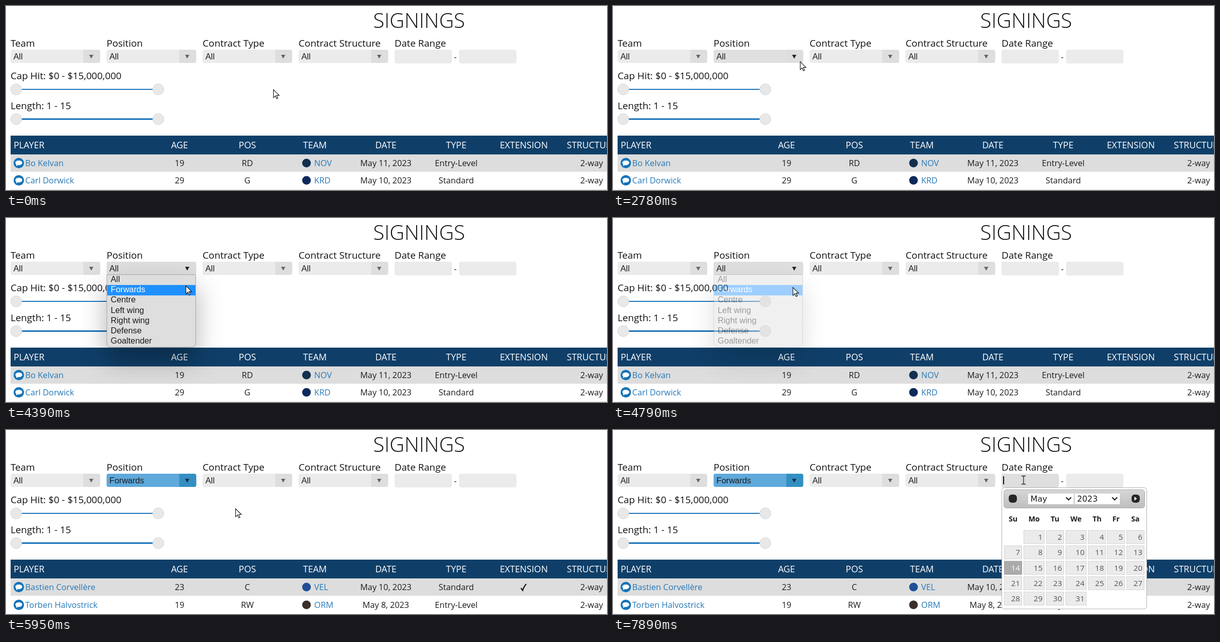
An HTML page that plays this animation: 1174 by 362 pixels, repeating every 8 s.

```html
<!DOCTYPE html>
<html lang="en">
<head>
<meta charset="utf-8">
<title>Signings</title>
<style>
  html, body { margin: 0; width: 100%; height: 100%; overflow: hidden; background: #fff; }
  svg { display: block; }
  text { font: 16.25px "Open Sans", "Noto Sans", sans-serif; fill: #1c1c1c; }
  .title { font-size: 40px; font-weight: 300; fill: #111; }
  .label { font-size: 18.75px; fill: #111; }
  .head { font-size: 17.5px; fill: #fff; }
  .link { fill: #2779b8; }
  .ui { font-family: "Liberation Sans", Arial, sans-serif; }
  .mid { text-anchor: middle; }
  .end { text-anchor: end; }
  .pick { font: 15.8px "DejaVu Sans", sans-serif; }
  .wd { font-size: 14.2px; font-weight: 700; }
  .day { font-size: 15px; fill: #555; }
  .shade { filter: drop-shadow(0 25px 25px rgba(0, 0, 0, .3)); }
</style>
</head>
<body>
<svg id="stage" width="1174" height="362" viewBox="0 0 1174 362">
  <defs>
    <linearGradient id="bar" x2="0" y2="1">
      <stop offset="0" stop-color="#d6d6d6"/><stop offset="1" stop-color="#bebebe"/>
    </linearGradient>
  </defs>
</svg>
<script>
const LOOP = 8000, TICK = 70;
const stage = document.getElementById('stage');

const text = (x, y, s, cls = '') => `<text x="${x}" y="${y}" class="${cls}">${s}</text>`;
const rect = (x, y, w, h, fill, more = '') =>
  `<rect x="${x}" y="${y}" width="${w}" height="${h}" fill="${fill}" ${more}/>`;
const path = (d, more) => `<path d="${d}" ${more}/>`;
const group = (id, body, more = '') => `<g id="${id}" ${more}>${body}</g>`;

function select(label, i) {
  const x = 9 + i * 187.5;
  return text(x, 80, label, 'label') +
    rect(x, 86, 175, 26, '#ebebeb', `rx="4" id="box${i}"`) +
    path(`M${x + 142} 86h29a4 4 0 0 1 4 4v18a4 4 0 0 1-4 4h-29z`, `fill="#dedede" id="btn${i}"`) +
    path(`M${x + 153.3} 96h8.4l-4.2 7.6z`, `fill="#666" id="arrow${i}"`) +
    `<text x="${x + 5.5}" y="105" class="ui" id="value${i}">All</text>`;
}

function slider(label, y, thick) {
  const knob = x => `<circle cx="${x}" cy="${y}" r="10.8" fill="#e8e8e8" stroke="#d6d6d6"/>`;
  return text(9, y - 20, label, 'label') +
    rect(20, y - thick / 2, 278, thick, '#1b75bb') + knob(20) + knob(297.5);
}

const COLS = [339, 471.5, 603.5, 742, 879.5, 1011.5, 1144];

function row(y, [name, age, pos, team, color, date, type, extended]) {
  const base = y + 6;
  const cell = (i, s) => text(COLS[i], base, s, 'mid');
  const bubble = `M25 ${y - 5}c4 0 6.7 2 6.7 4.6s-2.7 4.6-6.7 4.6q-1 0-2-.2-1.600 1.500-4 1.500` +
    `q1.300-1.200 1.200-2.600-1.900-1.300-1.900-3.300c0-2.600 2.700-4.600 6.700-4.600z`;
  return `<circle cx="25" cy="${y}" r="10.2" fill="#1574b9"/>` + path(bubble, 'fill="#fff"') +
    text(37.5, base, name, 'link') + cell(0, age) + cell(1, pos) +
    `<circle cx="587" cy="${y}" r="8.500" fill="${color}"/>` + text(602, base, team, 'link') +
    cell(3, date) + cell(4, type) + cell(6, '2-way') +
    (extended ? path(`M1006 ${y + 2}l3.300 4.500q2.500-8 7-12.500`,
      'fill="none" stroke="#111" stroke-width="2.200"') : '');
}

function popup() {
  const items = ['All', 'Forwards', 'Centre', 'Left wing', 'Right wing', 'Defense', 'Goaltender'];
  const shape = 'M197 111.500H370.500V246a8 8 0 0 1-8 8H205a8 8 0 0 1-8-8z';
  return path(shape, 'fill="#dedede" stroke="#a6a6a6" class="shade"') +
    rect(197.5, 111.5, 172.5, 20.5, '#1e90ff', 'id="mark"') +
    items.map((s, i) => `<text x="204.5" y="${126 + i * 20.2}" class="ui item">${s}</text>`).join('');
}

function calendar() {
  const cols = [[764, 35], [802, 41], [846, 35], [884, 41], [928, 35], [965, 35], [1003, 35]];
  const days = ['Su', 'Mo', 'Tu', 'We', 'Th', 'Fr', 'Sa'];
  const nav = (x, dir) => rect(x - 8, 127, 16, 16, '#252525', 'rx="6"') +
    path(`M${x - 2.5 * dir} 131l${5 * dir} 4-${dir > 0 ? 5 : -5} 4z`, 'fill="#fff"');
  const pick = (x, w, s) => rect(x, 125, w, 21, '#fff') + text(x + 4.5, 141, s, 'pick') +
    path(`M${x + w - 15} 132.500l5 5 5-5`, 'fill="none" stroke="#111" stroke-width="2"');
  let out = rect(759.5, 113.5, 283, 238.5, '#fff', 'rx="5" stroke="#b0b0b0"') +
    rect(763.5, 117.5, 275, 36, 'url(#bar)', 'rx="5" stroke="#aaa"') +
    nav(781, -1) + nav(1021, 1) + pick(811, 89, 'May') + pick(902, 88, '2023');
  cols.forEach(([x, w], i) => out += text(x + w / 2, 180, days[i], 'wd mid'));
  for (let d = 1; d <= 31; d++) {
    const [x, w] = cols[d % 7 ? d % 7 : 0];
    const y = 197 + Math.floor(d / 7) * 30.3;
    const today = d === 14;
    out += rect(x + .5, y + .5, w - 1, 26, today ? '#ababab' : '#ebebeb',
      `stroke="${today ? '#999' : '#d5d5d5'}"`) +
      `<text x="${x + w - 4}" y="${y + 19}" class="day end"${today ? ' style="fill:#fff"' : ''}>${d}</text>`;
  }
  return out;
}

const heads = ['AGE', 'POS', 'TEAM', 'DATE', 'TYPE', 'EXTENSION', 'STRUCTURE'];

stage.innerHTML += text(807, 43, 'SIGNINGS', 'title mid') +
  ['Team', 'Position', 'Contract Type', 'Contract Structure'].map(select).join('') +
  text(759, 80, 'Date Range', 'label') +
  rect(759, 86, 112, 27, '#ebebeb', 'rx="4" id="from"') + text(875, 106, '-') +
  rect(885, 86, 112, 27, '#ebebeb', 'rx="4"') +
  slider('Cap Hit: $0 - $15,000,000', 164, 2) +
  slider('Length: 1 - 15', 222.5, 3) +
  rect(9, 255, 1165, 37, '#0f3f69') + text(15, 280, 'PLAYER', 'head') +
  heads.map((s, i) => text(COLS[i], 280, s, 'head mid')).join('') +
  rect(9, 292, 1165, 34, '#dddddd') +
  group('everyone',
    row(309, ['Bo Kelvan', 19, 'RD', 'NOV', '#12304f', 'May 11, 2023', 'Entry-Level']) +
    row(343, ['Carl Dorwick', 29, 'G', 'KRD', '#0b2a5b', 'May 10, 2023', 'Standard']) +
    rect(9, 361, 1165, 1, '#ddd')) +
  group('forwards',
    row(309, ['Bastien Corvellère', 23, 'C', 'VEL', '#1f4f96', 'May 10, 2023', 'Standard', true]) +
    row(344, ['Torben Halvostrick', 19, 'RW', 'ORM', '#3a2f2a', 'May 8, 2023', 'Entry-Level'])) +
  group('popup', popup()) +
  group('calendar', calendar()) +
  rect(762, 91, 2, 16, '#111', 'id="caret"') +
  group('pointer', path('M.5.500V16.300L4.200 12.800 6.600 18.500 9 17.500 6.600 11.900H11.700Z',
    'fill="#fff" stroke="#111" stroke-width="1.100"')) +
  group('beam', path('M-4-8h3l1 1 1-1h3M0-7V7M-4 8h3l1-1 1 1h3',
    'fill="none" stroke="#222" stroke-width="1.300"'));

const $ = id => document.getElementById(id);
const show = (id, a) => $(id).style.opacity = a;
const paint = (id, c) => $(id).setAttribute('fill', c);
const ramp = (t, a, b) => Math.min(1, Math.max(0, (t - a) / (b - a)));
const mix = (a, b, k) => `rgb(${a.map((v, i) => Math.round(v + (b[i] - v) * k))})`;

// time, x, y of the pointer tip
const MOVES = [
  [1320, 522, 164], [1950, 442, 148], [2160, 413, 138], [2510, 378, 118], [2790, 361, 106],
  [3330, 361, 106], [3400, 359, 108], [4180, 353, 129], [4250, 352, 132], [4390, 351, 133],
  [4660, 351, 136], [5530, 351, 136], [5740, 385, 143], [6090, 490, 162], [6370, 587, 168],
  [6640, 690, 146], [6850, 763, 117], [6920, 778, 111], [7050, 793, 102],
  [7120, 793, 102], [7330, 802, 98.5]
];
const STARTS = [7190, 5600, 4390, 3400, 1390];
const GREY = [235, 235, 235], HOVER = [222, 222, 222], BLUE = [95, 169, 219];

function tip(t) {
  const i = MOVES.findIndex(m => m[0] > t);
  if (i === 0) return MOVES[0].slice(1);
  if (i < 0) return MOVES[MOVES.length - 1].slice(1);
  const [a, b] = [MOVES[i - 1], MOVES[i]], k = ramp(t, a[0], b[0]);
  return [1, 2].map(n => a[n] + (b[n] - a[n]) * k);
}

function draw(now) {
  const raw = now % LOOP;
  const start = STARTS.find(s => s <= raw) || 0;
  const t = start + Math.floor((raw - start) / TICK) * TICK;
  const [x, y] = tip(t);
  const done = raw >= 4860, over = raw >= 2650 && !done;

  const typing = x > 759 && y < 113;
  const move = `translate(${x.toFixed(1)} ${y.toFixed(1)})`;
  $('pointer').setAttribute('transform', move);
  $('beam').setAttribute('transform', move);
  show('pointer', typing ? 0 : 1);
  show('beam', typing ? 1 : 0);

  paint('box1', done ? mix(HOVER, BLUE, ramp(raw, 4862, 5070)) : mix(GREY, HOVER, ramp(raw, 2650, 2800)));
  paint('btn1', done ? '#338fc3' : '#dedede');
  paint('arrow1', done ? '#14293a' : over ? '#222' : '#666');
  $('value1').textContent = done ? 'Forwards' : 'All';
  show('everyone', done ? 0 : 1);
  show('forwards', done ? 1 : 0);

  show('popup', raw < 4000 ? ramp(raw, 2790, 2930) : 1 - ramp(raw, 4700, 4860));
  const pick = raw >= 4250 ? 1 : 0;
  $('mark').setAttribute('y', 111.5 + pick * 20.3);
  items.forEach((el, i) => el.style.fill = i === pick ? '#fff' : '#1c1c1c');

  paint('from', mix(GREY, HOVER, typing ? 1 : 0));
  show('caret', raw >= 7600 ? 1 : 0);
  show('calendar', ramp(raw, 7540, 7890));
}

const items = [...document.querySelectorAll('.item')];
const born = performance.now();
function frame() {
  draw(performance.now() - born);
  requestAnimationFrame(frame);
}
draw(0);
requestAnimationFrame(frame);
</script>
</body>
</html>
```
